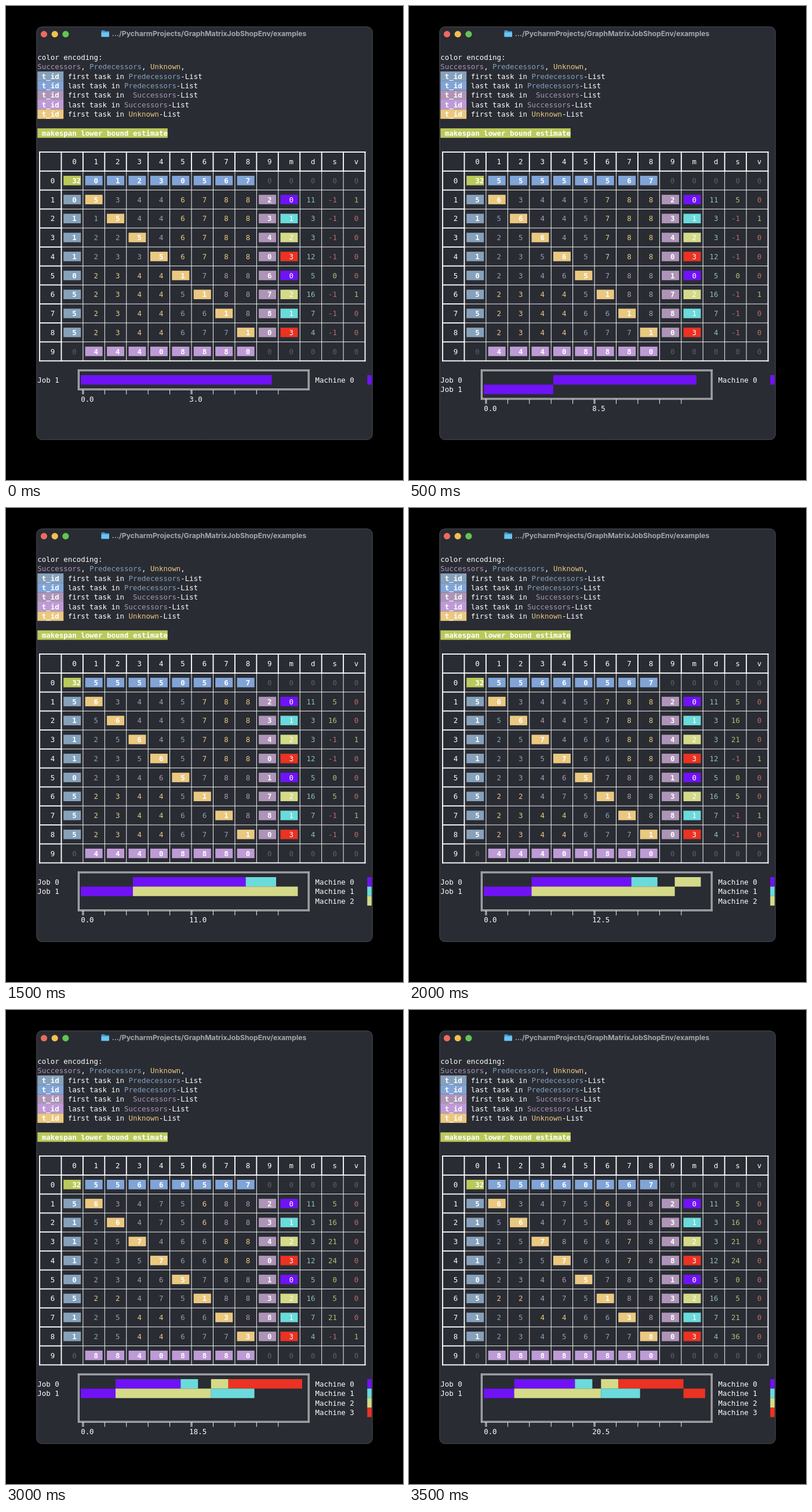
An HTML page with a canvas that plays this animation: 685x818 px, repeating every 4 s.

```html
<!DOCTYPE html>
<html lang="en">
<head>
<meta charset="utf-8">
<title>Job shop graph matrix</title>
<style>
  html, body { margin: 0; width: 685px; height: 818px; overflow: hidden; background: #000; }
  canvas { display: block; }
</style>
</head>
<body>
<canvas id="stage" width="685" height="818"></canvas>
<script>
const ctx = document.getElementById('stage').getContext('2d');

// Terminal character grid
const CW = 7.487, LH = 16.379, COLS = 52, THIN = 0.94, THICK = 1.87;
const colX = col => 54.28 + col * CW;
const midY = line => 88.3 + line * LH;

const WHITE = '#fff', DIM = '#5d6066', WINDOW = '#292c33';
const PRED = '#86a1bb', PRED_LAST = '#81a4d7', SUCC = '#ae95b8', SUCC_LAST = '#be9ad6';
const UNKNOWN = '#ebc880', BOUND = '#bbc95b';
const GREEN = '#b7bd70', RED = '#bf6a68', CYAN = '#90bdb6';
const MACHINE = ['#7012f6', '#6bdadb', '#d4da88', '#eb3223'];

// Two jobs of four tasks each, dispatched in a fixed order
const duration = [11, 3, 3, 12, 5, 16, 7, 4];
const machines = [0, 1, 2, 3, 0, 2, 1, 3];
const tasks = duration.map((d, i) => ({ id: i + 1, d, m: machines[i], job: i >> 2 }));
const order = [5, 1, 2, 6, 3, 7, 4, 8];
const ids = tasks.map(t => t.id);

function simulate(count) {
  const start = {}, before = {}, lastOn = {};
  const end = id => id ? start[id] + tasks[id - 1].d : 0;
  const jobPred = id => id % 4 === 1 ? 0 : id - 1;
  for (const id of ids) before[id] = new Set(jobPred(id) ? [jobPred(id)] : []);
  const done = order.slice(0, count);
  for (const id of done) {
    const prev = lastOn[tasks[id - 1].m];
    if (prev) before[id].add(prev);
    start[id] = Math.max(end(jobPred(id)), end(prev));
    lastOn[tasks[id - 1].m] = id;
  }
  // Transitive closure of the precedence relation
  for (const k of ids) for (const i of ids)
    if (before[i].has(k)) before[k].forEach(p => before[i].add(p));
  const isReady = id => !(id in start) && (!jobPred(id) || jobPred(id) in start);
  return { start, end, before, done, isReady };
}

function text(str, col, line, color = WHITE, bold = false) {
  ctx.font = `${bold ? 'bold ' : ''}12.44px "DejaVu Sans Mono", monospace`;
  ctx.fillStyle = color;
  [...str].forEach((ch, i) => ctx.fillText(ch, colX(col + i), midY(line) + 4.65));
  return col + str.length;
}

function block(col, line, width, color) {
  ctx.fillStyle = color;
  ctx.fillRect(colX(col), midY(line) - LH / 2, width * CW, LH);
}

function hLine(x1, x2, y, weight) {
  ctx.fillStyle = WHITE;
  ctx.fillRect(x1 - weight / 2, y - weight / 2, x2 - x1 + weight, weight);
}

function vLine(x, y1, y2, weight) {
  ctx.fillStyle = WHITE;
  ctx.fillRect(x - weight / 2, y1 - weight / 2, weight, y2 - y1 + weight);
}

function drawWindow() {
  ctx.fillStyle = '#000';
  ctx.fillRect(0, 0, 685, 818);
  ctx.beginPath();
  ctx.roundRect(52.4, 35.6, 580.2, 713.2, 9.5);
  ctx.fillStyle = WINDOW;
  ctx.fill();
  ctx.beginPath();
  ctx.roundRect(52.9, 36.1, 579.2, 712.2, 9);
  ctx.strokeStyle = '#45484e';
  ctx.lineWidth = 1;
  ctx.stroke();
  ['#ed6a5e', '#f4bf4f', '#61c554'].forEach((color, i) => {
    ctx.beginPath();
    ctx.arc(65.5 + i * 18.7, 48.6, 5.6, 0, 7);
    ctx.fillStyle = color;
    ctx.fill();
  });
  ctx.fillStyle = '#3d9ad3';
  ctx.beginPath();
  ctx.roundRect(164.5, 42, 6, 6, 1);
  ctx.roundRect(164.5, 43.5, 13.5, 10, 1);
  ctx.fill();
  ctx.fillStyle = '#6cc4f0';
  ctx.fillRect(164.5, 45.5, 13.5, 7.5);
  ctx.font = 'bold 12.22px Inter, sans-serif';
  ctx.fillStyle = '#a5a7aa';
  ctx.fillText('.../PycharmProjects/GraphMatrixJobShopEnv/examples', 182.8, 52.4);
}

function drawLegend() {
  text('color encoding:', 0, 0);
  let col = text('Successors', 0, 1, SUCC);
  col = text(', ', col, 1);
  col = text('Predecessors', col, 1, PRED);
  col = text(', ', col, 1);
  col = text('Unknown', col, 1, UNKNOWN);
  text(',', col, 1);
  [
    [PRED, 'first task in ', 'Predecessors', PRED],
    [PRED_LAST, 'last task in ', 'Predecessors', PRED],
    [SUCC, 'first task in  ', 'Successors', SUCC],
    [SUCC_LAST, 'last task in ', 'Successors', SUCC],
    [UNKNOWN, 'first task in ', 'Unknown', UNKNOWN],
  ].forEach(([back, lead, name, color], i) => {
    block(0, i + 2, 6, back);
    text('t_id', 1, i + 2, WHITE, true);
    const next = text(name, text(lead, 7, i + 2), i + 2, color);
    text('-List', next, i + 2);
  });
  block(0, 8, 30, BOUND);
  text('makespan lower bound estimate', 1, 8, WHITE, true);
}

function drawGrid() {
  const x = k => colX(0.5 + 5 * k), y = k => midY(10 + 2 * k);
  const right = x(15), bottom = y(11);
  for (let k = 0; k <= 15; k++) {
    const outer = k < 2 || k === 15;
    vLine(x(k), y(0), outer ? bottom : y(1), THICK);
    if (!outer) vLine(x(k), y(1), bottom, THIN);
  }
  for (let k = 0; k <= 11; k++) {
    const outer = k < 2 || k === 11;
    hLine(x(0), outer ? right : x(1), y(k), THICK);
    if (!outer) hLine(x(1), right, y(k), THIN);
  }
}

function cell(row, column, value, color, back, bold = !!back) {
  const col = 8 + 5 * column, line = 13 + 2 * row, str = String(value);
  if (back) block(col - 2, line, 4, back);
  text(str, col + 1 - str.length, line, color, bold);
}

function drawMatrix({ start, before, isReady }) {
  [...'0123456789mdsv'].forEach((name, i) => cell(-1, i, name, WHITE));
  for (let row = 0; row < 10; row++) cell(row, -1, row, WHITE);
  for (const row of [0, 9])
    for (let c = 9; c < 14; c++) cell(row, c, 0, DIM);
  cell(9, 0, 0, DIM);
  block(6, 13, 4, BOUND);
  text('32', 8, 13, WHITE, true);

  for (const { id, d, m } of tasks) {
    const pred = ids.filter(j => before[id].has(j));
    const succ = ids.filter(j => before[j].has(id));
    const unknown = ids.filter(j => j !== id && !pred.includes(j) && !succ.includes(j));
    // Each entry points to the next member of its list, the last one to itself
    [[pred, PRED], [succ, SUCC], [unknown, UNKNOWN]].forEach(([list, color]) =>
      list.forEach((j, i) => cell(id, j, list[i + 1] || j, color)));
    cell(0, id, pred.at(-1) || 0, WHITE, PRED_LAST);
    cell(9, id, succ.at(-1) || 0, WHITE, SUCC_LAST);
    cell(id, 0, pred[0] || 0, WHITE, PRED);
    cell(id, id, unknown[0] || id, WHITE, UNKNOWN);
    cell(id, 9, succ[0] || 0, WHITE, SUCC);
    cell(id, 10, m, WHITE, MACHINE[m], false);
    cell(id, 11, d, CYAN);
    cell(id, 12, start[id] ?? -1, id in start ? GREEN : RED);
    cell(id, 13, +isReady(id), isReady(id) ? GREEN : RED);
  }
}

function drawChart({ start, end, done }) {
  const used = key => [...new Set(done.map(id => tasks[id - 1][key]))].sort();
  const jobs = used('job'), active = used('m');
  const bottomLine = 34 + Math.max(jobs.length, active.length);
  const span = Math.max(...done.map(end)) + 1;

  jobs.forEach((job, i) => {
    text('Job ' + job, 0, 34 + i);
    for (const { id, m } of tasks.filter(t => t.job === job && t.id in start)) {
      const from = Math.ceil(start[id] * COLS / span);
      const to = Math.floor(end(id) * COLS / span) + 1;
      block(10 + from, 34 + i, to - from, MACHINE[m]);
    }
  });
  active.forEach((m, i) => {
    text('Machine ' + m, 64, 34 + i);
    block(76, 34 + i, 1, MACHINE[m]);
  });

  const left = colX(9.5), right = colX(62.5), top = midY(33), bottom = midY(bottomLine);
  for (const d of [-THIN, THIN]) {
    hLine(left + d, right - d, top + d, THIN);
    hLine(left + d, right - d, bottom - d, THIN);
    vLine(left + d, top + d, bottom - d, THIN);
    vLine(right - d, top + d, bottom - d, THIN);
  }
  for (let c = 10; c <= 55; c += 5)
    for (const dx of c % 25 === 10 ? [-THIN, THIN] : [0])
      vLine(colX(c + 0.5) + dx, bottom + THIN, bottom + LH / 2, THIN);
  text('0.0', 10, bottomLine + 1);
  text((span / 2).toFixed(1), 35, bottomLine + 1);
}

function draw() {
  const state = simulate(1 + Math.floor(performance.now() % 4000 / 500));
  drawWindow();
  drawLegend();
  drawGrid();
  drawMatrix(state);
  drawChart(state);
  requestAnimationFrame(draw);
}
draw();
</script>
</body>
</html>
```
